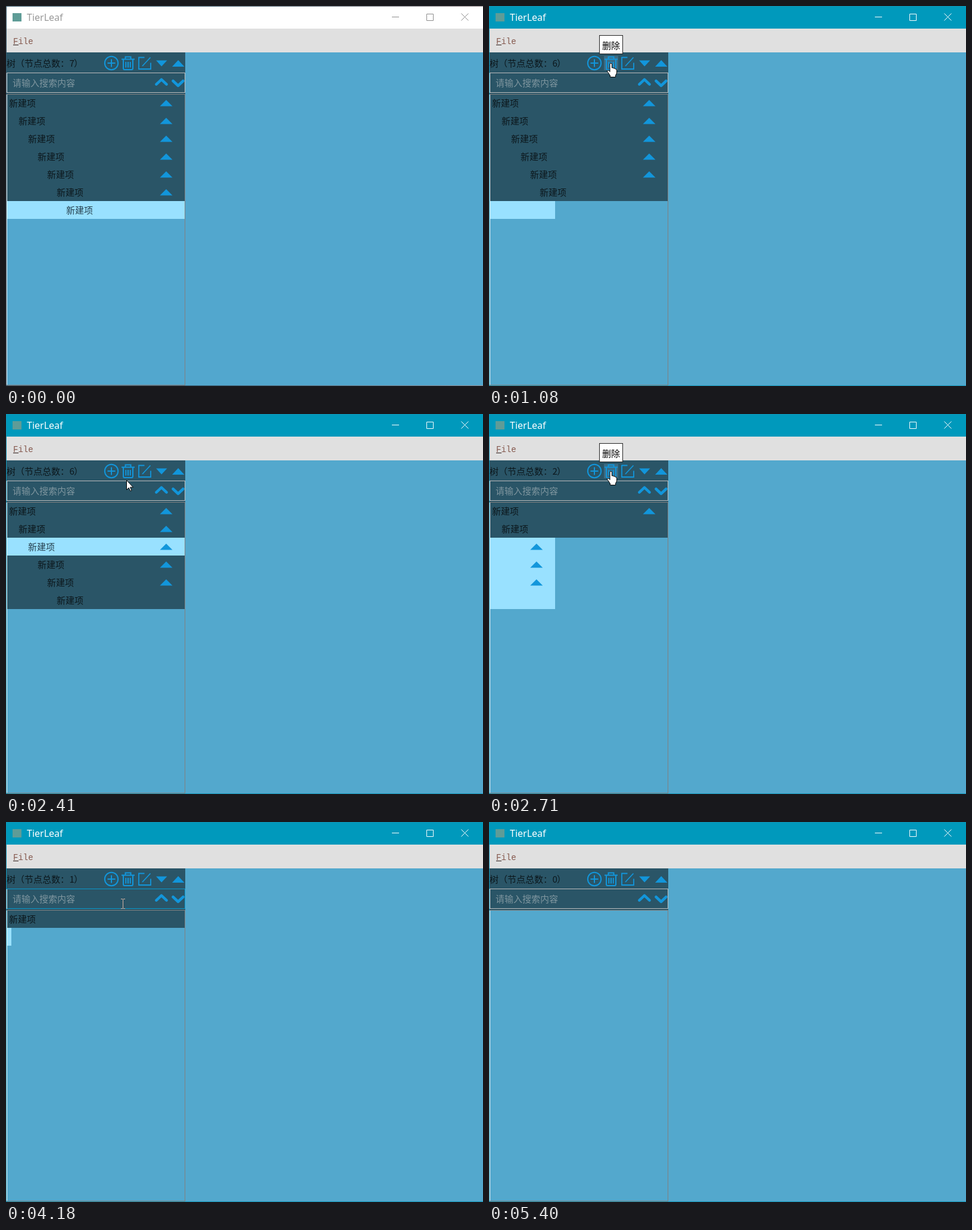
Animation, 801 px wide and 639 px high, one loop 5.95 s. Source, as an HTML page:

```html
<!DOCTYPE html>
<html lang="zh">
<head>
<meta charset="utf-8">
<title>Tree editor</title>
<style>
  html, body { margin: 0; width: 100%; height: 100%; overflow: hidden; background: #53a8cd; }
  svg { display: block; width: 801px; height: 639px; }
  text { font: 300 15px "Noto Sans CJK SC", "Noto Sans CJK", "Noto Sans CJK JP", sans-serif; fill: #0c171c; white-space: pre; }
  rect { shape-rendering: crispEdges; }
  .icon { fill: none; stroke: #1296db; stroke-width: 2; }
  .solid { fill: #1296db; }
  .thick { stroke-width: 4.5; stroke-linecap: round; stroke-linejoin: round; }
</style>
</head>
<body>
<svg viewBox="0 0 801 639">
  <defs>
    <clipPath id="list"><rect x="2" y="149" width="298" height="488"/></clipPath>
    <linearGradient id="edge"><stop offset=".4" stop-color="#35566a"/><stop offset="1" stop-color="#8f8285"/></linearGradient>
  </defs>
  <rect id="back" width="801" height="639"/>
  <rect id="bar" width="801" height="38"/>
  <rect x="11" y="12" width="15" height="14" fill="#5f9c97"/>
  <text id="title" x="35" y="25" style="font: 16px 'Noto Sans', sans-serif">TierLeaf</text>
  <path id="buttons" fill="none" d="M648 18.5H660M706.5 13.5H717.5V24.5H706.5ZM764.5 12.5L776.5 24.5M776.5 12.5L764.5 24.5"/>
  <rect y="38" width="801" height="40" fill="#e0e0e0"/>
  <text x="12" y="63.5" style="font: 14px 'Liberation Mono', monospace; fill: #84574c">File</text>
  <rect x="12" y="65" width="9" height="1" fill="#2c1a16"/>

  <rect x="1" y="78" width="300" height="70" fill="#2a5567"/>
  <rect id="glow" x="193" y="84" width="24" height="24" fill="#3c6c85"/>
  <text x="1" y="101.5">树（节点总数：<tspan id="count" x="106.5"></tspan><tspan x="114">）</tspan></text>
  <g class="icon">
    <circle cx="177" cy="96" r="11.2"/>
    <path d="M170.5 96H183.5M177 89.5V102.5"/>
    <path d="M194 89.5H216M200.5 89V85.5H209.5V89M197 90V105Q197 107 199 107H211Q213 107 213 105V90M201.3 94V103.5M205 94V103.5M208.7 94V103.5"/>
    <path d="M232.5 86.5H223V106H243V95.5M229 101L242.5 86.5" stroke-width="1.8"/>
  </g>
  <path class="solid" d="M252 91.5H270.5L261.2 101.5ZM279 102H299.5L289.2 91Z"/>
  <rect id="field" x="1.5" y="112.5" width="299" height="33" fill="none"/>
  <rect x="1" y="113" width="1" height="33" fill="#e4eaec"/>
  <text x="11" y="135" style="fill: #7f969f">请输入搜索内容</text>
  <path class="icon thick" d="M252.5 131.7L261 123.7L269.5 131.7M280.5 126L289 134L297.5 126"/>

  <g id="rows" clip-path="url(#list)"></g>
  <path d="M1 148.5H300.5V637.5H1" fill="none" stroke="#808080" shape-rendering="crispEdges"/>
  <rect x="1" y="149" width="1" height="488" fill="#f4f8fa"/>
  <path id="frame" d="M801 .5H.5V638.5H801" fill="none" shape-rendering="crispEdges"/>

  <g id="tip">
    <rect x="185.5" y="49.5" width="39" height="31" fill="#fff" stroke="#222"/>
    <text x="190" y="72" style="fill: #000; font-weight: 400">删除</text>
  </g>
  <g id="cursor" stroke="#000" stroke-linejoin="round">
    <path id="arrow" fill="#fff" d="M.5 .5V16.5L4.2 13L6.8 18.5L9 17.5L6.5 12.2H11.5Z"/>
    <path id="hand" fill="#fff" d="M-2 2Q-2 .3 -.3 .3T1.4 2V8Q4 7 4.4 9Q6.6 8 7.2 10Q9.5 9.5 9.5 12V17L7.5 20.5V23.5H-1.5V21L-6 14.5Q-7 12.5 -5.5 12T-2 14.5Z"/>
    <path id="beam" fill="none" stroke="#d8b3a2" shape-rendering="crispEdges" d="M-3 -7.5H0M1 -7.5H4M.5 -7V8M-3 8.5H0M1 8.5H4"/>
  </g>
  <circle id="press" r="15" fill="#ff0" opacity=".5"/>
</svg>
<script>
const LOOP = 5950, TICK = 77.4, ENTER = 70, ACTIVE = 760, LEAVE = 5400;
const ROWS = 7, ROW = 30, TOP = 148, WIDE = 298, SHRINK = 200, PRESS = 120;
const BIN = { x: 205, y: 96 };
const $ = id => document.getElementById(id);

// Each job picks a row at (x, y), then the bin removes it with its children.
const jobs = [
  { pick: -130, row: 6, cut: 957, x: 571, y: 459 },
  { pick: 1670, row: 2, cut: 2582, x: 179, y: 237 },
  { pick: 3200, row: 1, cut: 3984, x: 162, y: 178 },
  { pick: 4430, row: 0, cut: 4960, x: 190, y: 161 }
];
const exit = [[5250, 287, 261], [5340, 524, 524]];

const show = (el, on) => el.setAttribute("display", on ? "inline" : "none");
const during = (t, from, to) => t >= from && t < to;
const easeOut = p => 1 - (1 - p) ** 4;
const linear = p => p;

// Pointer stops: rest on the row, go to the bin, wait, go to the next row.
const stops = jobs.flatMap(({ pick, cut, x, y }, i) => [
  { t: i ? jobs[i - 1].cut + 430 : 0, x, y, ease: easeOut },
  { t: pick + 200, x, y, ease: linear },
  { t: cut - 120, ...BIN, ease: linear },
  { t: cut + 130, ...BIN, ease: linear }
]).concat(exit.map(([t, x, y]) => ({ t, x, y, ease: linear })));

function pointer(t) {
  const i = Math.max(1, stops.findIndex(s => s.t > t));
  if (t >= stops[stops.length - 1].t) return stops[stops.length - 1];
  const a = stops[i - 1], b = stops[i];
  const e = b.ease(Math.max(0, (t - a.t) / (b.t - a.t)));
  return { x: a.x + (b.x - a.x) * e, y: a.y + (b.y - a.y) * e };
}

function make(tag, attrs, parent) {
  const el = document.createElementNS("http://www.w3.org/2000/svg", tag);
  for (const k in attrs) el.setAttribute(k, attrs[k]);
  return parent.appendChild(el);
}

const rows = Array.from({ length: ROWS }, (_, i) => {
  const g = make("g", { transform: `translate(0 ${TOP + i * ROW})` }, $("rows"));
  const box = make("rect", { x: 2, height: ROW }, g);
  const label = make("text", { x: 5 + 16 * i, y: 20.5 }, g);
  label.textContent = "新建项";
  const mark = make("path", { class: "solid", d: "M-10.5 20.5H10.5L0 10Z" }, g);
  return { g, box, label, mark };
});

function drawRows(t) {
  const n = jobs.filter(j => t >= j.pick).length - 1, job = jobs[n];
  const total = n ? jobs[n - 1].row : ROWS;
  const left = t >= job.cut ? job.row : total;
  const shrunk = WIDE * Math.max(0, 1 - (t - job.cut) / SHRINK);
  rows.forEach(({ g, box, label, mark }, i) => {
    const gone = i >= left, picked = i === job.row, w = gone ? shrunk : WIDE;
    show(g, i < total && w > 0);
    box.setAttribute("width", w);
    box.setAttribute("fill", gone || picked ? "#99e1ff" : "#2a5567");
    show(label, !gone);
    label.style.fill = picked ? "#26404e" : "";
    show(mark, i < (gone ? total : left) - 1);
    mark.setAttribute("transform", `translate(${w - 29} 0)`);
  });
  $("count").textContent = left;
}

function drawWindow(active) {
  $("back").setAttribute("fill", active ? "#53a8cd" : "#52a7ce");
  $("bar").setAttribute("fill", active ? "#0099bc" : "#fff");
  $("title").style.fill = active ? "#fff" : "#999";
  $("buttons").setAttribute("stroke", active ? "#fff" : "#8c8c8c");
  $("frame").setAttribute("stroke", active ? "#1193b5" : "url(#edge)");
}

function drawPointer(t, seen) {
  const { x, y } = pointer(t);
  const search = seen && x < 301 && during(y, 112, 146);
  const trash = seen && during(x, 193, 217) && during(y, 84, 108);
  const beam = search && x < 247;
  const pressed = jobs.some(({ pick, cut }) =>
    during(t, pick, pick + PRESS) || during(t, cut - 100, cut - 100 + PRESS));

  $("field").setAttribute("stroke", search ? "#0b98cc" : "#bdbdbd");
  show($("glow"), trash);
  show($("tip"), jobs.some(({ cut }) => during(t, cut - 40, cut + 190)));
  show($("cursor"), seen);
  show($("beam"), beam);
  show($("hand"), trash);
  show($("arrow"), !beam && !trash);
  show($("press"), seen && pressed);
  const place = `translate(${Math.round(x)} ${Math.round(y)})`;
  for (const id of ["cursor", "press"]) $(id).setAttribute("transform", place);
}

function draw(time) {
  // The picture refreshes at a steady rate and holds in between.
  const t = Math.floor((time + 10) / TICK) * TICK;
  drawWindow(t >= ACTIVE);
  drawRows(t);
  drawPointer(t, during(time, ENTER, LEAVE));
}

const start = performance.now();
function loop() {
  draw((performance.now() - start) % LOOP);
  requestAnimationFrame(loop);
}
loop();
</script>
</body>
</html>
```
